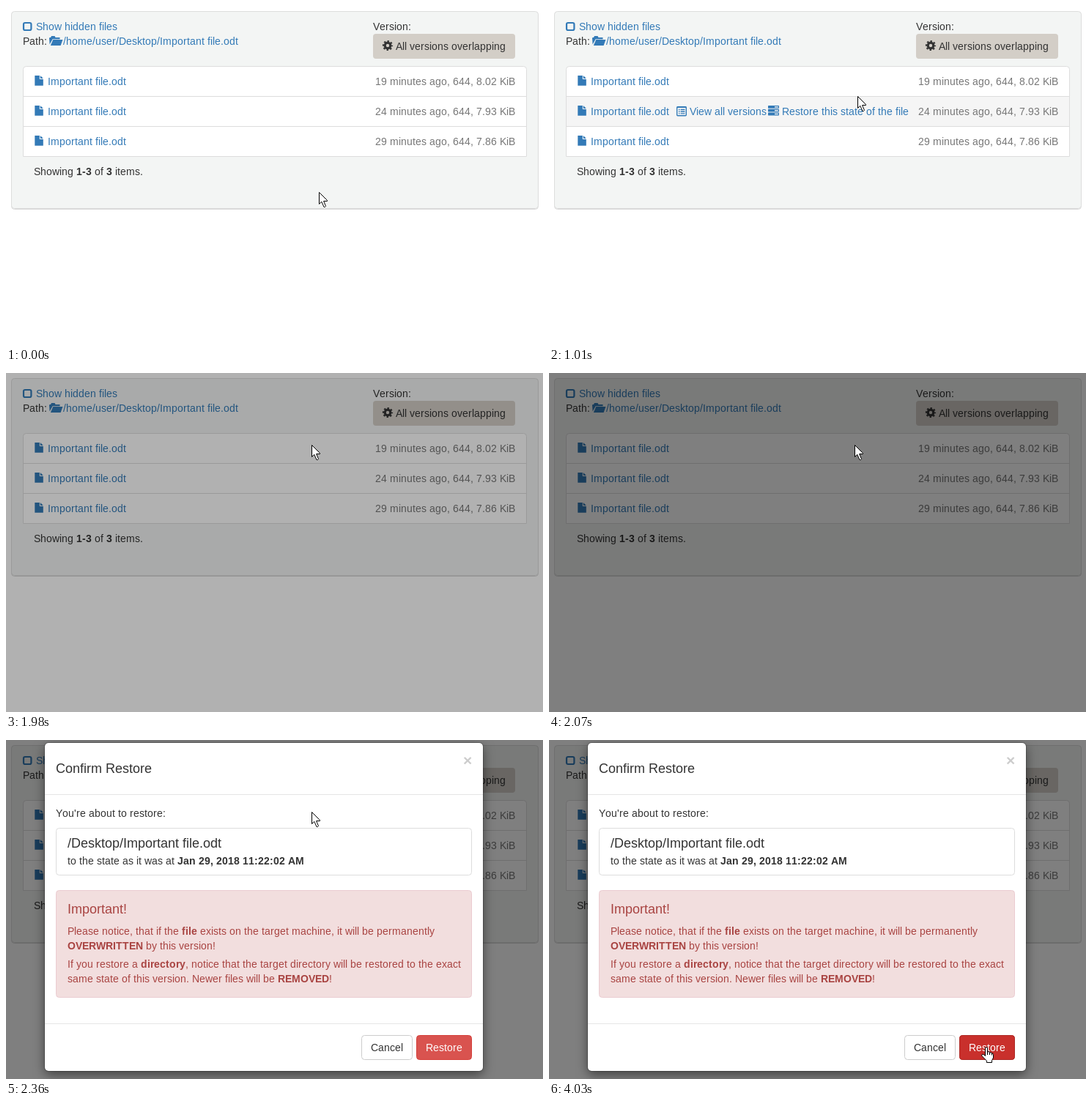
An HTML page that plays this animation: 733x463 px, repeating every 4960 ms.

```html
<!DOCTYPE html>
<html lang="en">
<head>
<meta charset="utf-8">
<title>Restore a file</title>
<style>
  html, body { margin: 0; width: 100%; height: 100%; overflow: hidden; background: #fff; }
  svg { display: block; width: 733px; height: 463px; }
  text { font: 14px "Liberation Sans", Arial, sans-serif; font-kerning: none; fill: #333; white-space: pre; }
  tspan { font-weight: bold; }
  .title { font-size: 18px; }
  .link text, .icon { fill: #337ab7; }
  .line { fill: none; stroke: #337ab7; }
  .meta { fill: #777; }
  .box { fill: #fff; stroke: #ddd; }
  .rule { stroke: #e5e5e5; }
  .danger text { fill: #a94442; }
  .close { font-size: 21px; font-weight: bold; fill: #ccc; }
  .paper { filter: drop-shadow(0 5px 7.5px rgba(0, 0, 0, .5)); }
  .pointer { fill: #fff; stroke: #000; stroke-linejoin: round; }
  #hover, #shade, #modal, #pressed, #hand { opacity: 0; }
</style>
</head>
<body>
<svg viewBox="0 0 733 463">
  <defs>
    <g id="file" class="icon">
      <path d="M0 0H6.5V5H11.5V13.8H0Z"/>
      <path d="M7.5 0L11.5 4H7.5Z"/>
    </g>
    <g id="bar">
      <rect class="icon" width="15" height="3.8" rx=".6"/>
      <rect x="9" y="1.2" width="4.8" height="1.4" fill="#f5f5f5"/>
    </g>
  </defs>

  <!-- file browser -->
  <rect x="7.5" y="8.5" width="719" height="269" rx="4" fill="none" stroke="#d5d5d5"/>
  <rect x="7.5" y="7.5" width="719" height="269" rx="4" fill="#f3f5f4" stroke="#ddd"/>
  <rect class="line" x="24" y="23" width="10.4" height="10" rx="2" stroke-width="2.2"/>
  <g class="link">
    <text x="41" y="33">Show hidden files</text>
    <text x="78" y="53">/home/user/Desktop/Important file.odt</text>
  </g>
  <text x="23" y="53">Path:</text>
  <g class="icon" transform="translate(59 41)">
    <path d="M.6 11.5L0 3Q0 2 1 2H2L3 0H7.5L8.5 2H14.5V4.2H4.6Z"/>
    <path d="M5.2 5H18.5L15.6 13H1.8Z"/>
  </g>
  <text x="501" y="33">Version:</text>
  <rect x="501" y="38" width="194" height="34" rx="4" fill="#d3cec7"/>
  <g transform="translate(521 54)" fill="none" stroke="#333">
    <circle r="3.8" stroke-width="3.2"/>
    <circle r="6" stroke-width="2.2" stroke-dasharray="2.356" stroke-dashoffset="1.178"/>
  </g>
  <text x="532" y="60">All versions overlapping</text>

  <path class="box" d="M23.5 205.5V86.5Q23.5 82.5 27.5 82.5H706.5Q710.5 82.5 710.5 86.5V205.5Z"/>
  <g id="hover">
    <rect x="24" y="83" width="686" height="40" fill="#f5f5f5"/>
    <g class="line" stroke-width="1.4">
      <rect x="174.7" y="96.7" width="12.6" height="12" rx="1"/>
      <path d="M174.7 97.2H187.3M177 100.5H178.4M177 103.2H178.4M177 105.9H178.4M179.6 100.5H185.4M179.6 103.2H185.4M179.6 105.9H185.4"/>
    </g>
    <use href="#bar" x="299" y="95"/>
    <use href="#bar" x="299" y="99.8"/>
    <use href="#bar" x="299" y="104.6"/>
    <g class="link">
      <text x="192" y="108">View all versions</text>
      <text x="318" y="108">Restore this state of the file</text>
    </g>
  </g>
  <path d="M24 123.5H710M24 164.5H710" stroke="#ddd"/>
  <g class="link">
    <use href="#file" x="39.3" y="95"/><text x="57" y="108">Important file.odt</text>
    <use href="#file" x="39.3" y="136"/><text x="57" y="149">Important file.odt</text>
    <use href="#file" x="39.3" y="177"/><text x="57" y="190">Important file.odt</text>
  </g>
  <text class="meta" x="695" y="108">19 minutes ago, 644, 8.02 KiB</text>
  <text class="meta" x="695" y="149">24 minutes ago, 644, 7.93 KiB</text>
  <text class="meta" x="695" y="190">29 minutes ago, 644, 7.86 KiB</text>
  <text x="38" y="231">Showing <tspan>1-3</tspan> of <tspan>3</tspan> items.</text>

  <rect id="shade" width="733" height="463"/>

  <!-- confirmation dialog -->
  <g id="modal">
    <rect class="paper" x="53" y="4" width="598" height="448" rx="5" fill="#fff"/>
    <rect x="52.5" y="3.5" width="599" height="449" rx="5.5" fill="none" stroke="#000" stroke-opacity=".2"/>
    <text class="title" x="68" y="45">Confirm Restore</text>
    <text class="close" x="624" y="35">×</text>
    <path class="rule" d="M53 74.5H651M53 387.5H651"/>
    <text x="68" y="105">You're about to restore:</text>
    <rect class="box" x="68.5" y="120.5" width="567" height="64" rx="4"/>
    <text class="title" x="84" y="147">/Desktop/Important file.odt</text>
    <text x="84" y="170">to the state as it was at <tspan>Jan 29, 2018 11:22:02 AM</tspan></text>
    <g class="danger">
      <rect x="68.5" y="205.5" width="567" height="146" rx="4" fill="#f2dede" stroke="#ebccd1"/>
      <text class="title" x="84" y="237">Important!</text>
      <text x="84" y="266">Please notice, that if the <tspan>file</tspan> exists on the target machine, it will be permanently</text>
      <text x="84" y="286"><tspan>OVERWRITTEN</tspan> by this version!</text>
      <text x="84" y="311">If you restore a <tspan>directory</tspan>, notice that the target directory will be restored to the exact</text>
      <text x="84" y="331">same state of this version. Newer files will be <tspan>REMOVED</tspan>!</text>
    </g>
    <rect x="485.5" y="403.5" width="69" height="33" rx="4" fill="#fff" stroke="#ccc"/>
    <text x="498" y="425">Cancel</text>
    <rect x="560.5" y="403.5" width="75" height="33" rx="4" fill="#d9534f" stroke="#d43f3a"/>
    <rect id="pressed" x="560.5" y="403.5" width="75" height="33" rx="4" fill="#c9302c" stroke="#ac2925"/>
    <text x="573" y="425" style="fill:#fff">Restore</text>
  </g>

  <g id="arrow" class="pointer">
    <path d="M.5 .5V16.5L3.8 13.3L7 20.5H8.5L9.5 19.5L6.6 12.5H11.5V11.5Z"/>
  </g>
  <g id="hand" class="pointer">
    <path d="M5.5 12.5V2Q5.5 .5 7 .5T8.5 2V7Q11.4 5.8 11.5 7.8Q14.3 7 14.4 9Q16.5 8.4 16.5 10.8V15L14.5 18.8V21.5H7.5V19.2L1 12.6Q0 10.6 1.8 10.2Q3.4 10.2 5.5 12.5Z"/>
    <path d="M8.5 7V11M11.5 8V11M14.4 9V11.5" fill="none"/>
  </g>
</svg>
<script>
  const LOOP = 4960, STEP = 80;
  const LIST_TOP = 83, ROW = 41, BUTTON_TOP = 403;
  const CLICK = 1880, FADE_START = 1868, SLIDE_START = 2070;

  const clamp = v => Math.min(1, Math.max(0, v));
  const easeOut = p => 1 - (1 - p) ** 1.75;
  const smooth = p => p * p * (3 - 2 * p);

  // Pointer moves: start time, number of steps, end point, easing.
  const moves = [
    { start: 450, steps: 12, to: [420, 100], ease: easeOut },
    { start: 1490, steps: 1, to: [418, 99], ease: easeOut },
    { start: 1640, steps: 1, to: [417, 98], ease: easeOut },
    { start: 2750, steps: 11, to: [577, 397], ease: smooth },
    { start: 3630, steps: 6, to: [595, 421], ease: easeOut }
  ];

  function tipAt(t) {
    let tip = [427, 254];
    for (const { start, steps, to, ease } of moves) {
      const p = ease(clamp(Math.floor((t - start) / STEP + 1) / steps));
      tip = tip.map((v, i) => v + (to[i] - v) * p);
    }
    return tip.map(Math.round);
  }

  // Whole-pixel glyph advances, as in hinted screen text.
  function snapGlyphs(text) {
    const widths = Array.from({ length: text.getNumberOfChars() },
      (_, i) => Math.round(text.getSubStringLength(i, 1)));
    let x = Number(text.getAttribute('x'));
    if (text.matches('.meta')) x -= widths.reduce((a, b) => a + b);
    text.setAttribute('x', widths.map(w => (x += w) - w).join(' '));
  }

  function show(id, opacity, x = 0, y = 0) {
    const { style } = document.getElementById(id);
    style.opacity = Number(opacity);
    style.transform = `translate(${x}px, ${y}px)`;
  }

  function render(t) {
    const [x, y] = tipAt(t);

    // The row highlight trails the pointer by one step.
    const row = Math.floor((tipAt(t - STEP)[1] - LIST_TOP) / ROW);
    const rowActive = t < CLICK && row < 3;
    const inRow = (y - LIST_TOP) % ROW;
    const overLink = rowActive && inRow >= 10 && inRow <= 30;
    const overButton = y >= BUTTON_TOP;
    const isHand = overLink || overButton;

    show('hover', rowActive, 0, row * ROW);
    show('pressed', overButton);
    show('arrow', !isHand, x, y);
    show('hand', isHand, x - 5, y - 2);

    const held = CLICK + STEP * Math.floor((t - CLICK) / STEP);
    const slide = easeOut(clamp((held - SLIDE_START) / 300));
    show('shade', clamp((held - FADE_START) / 150) / 2);
    show('modal', clamp((held - SLIDE_START) / 150), 0, Math.round(-112 * (1 - slide)));
  }

  function frame() {
    render(performance.now() % LOOP);
    requestAnimationFrame(frame);
  }

  document.querySelectorAll('text').forEach(snapGlyphs);
  frame();
</script>
</body>
</html>
```
